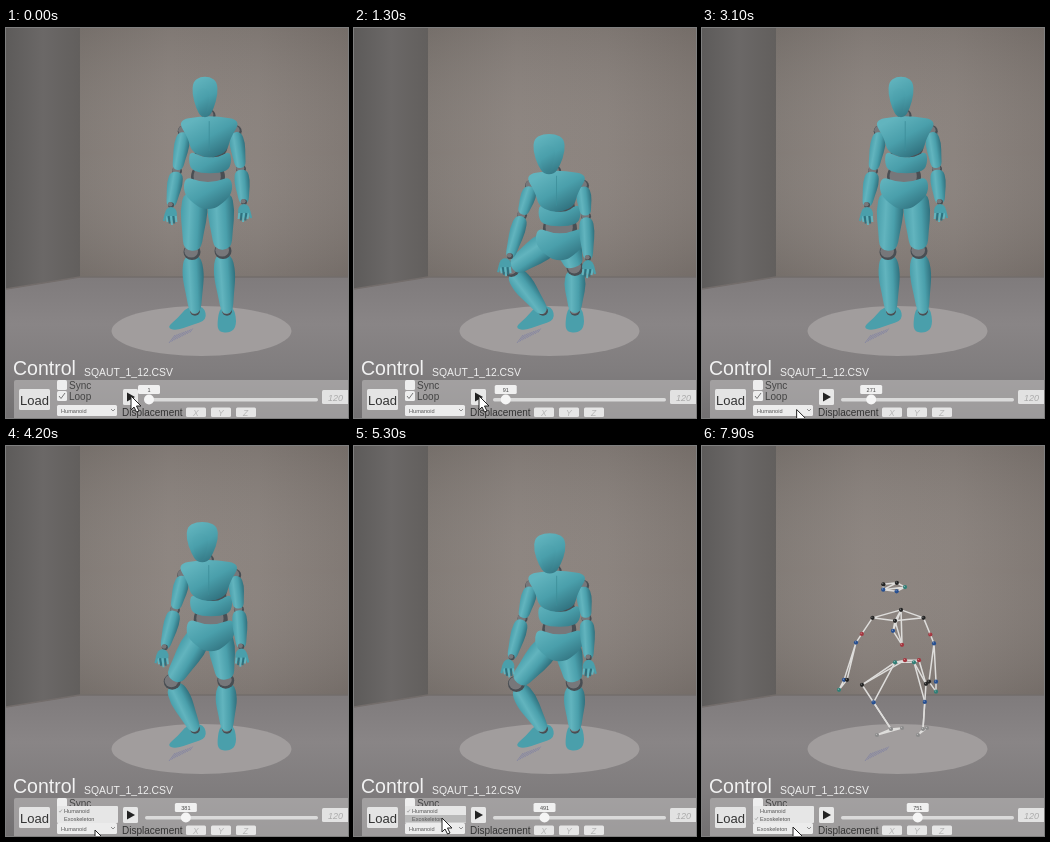
An HTML page with a canvas that plays this animation: 342x390 px, repeating every 8000 ms.

```html
<!DOCTYPE html>
<html lang="en">
<head>
<meta charset="utf-8">
<title>Squat playback</title>
<style>
html, body { margin: 0; width: 100%; height: 100%; overflow: hidden; background: #777; }
canvas { display: block; width: 342px; height: 390px; }
</style>
</head>
<body>
<canvas id="stage"></canvas>
<script>
const W = 342, H = 390, LOOP = 8000, STEP = 100;
const PLAY = 400, PERIOD = 3200, SWITCH = 5700, GROUND = 283;
const canvas = document.getElementById('stage'), c = canvas.getContext('2d');
const dpr = window.devicePixelRatio || 1;
canvas.width = W * dpr;
canvas.height = H * dpr;
c.scale(dpr, dpr);

const TEAL = '#4a9fab', LIGHT = '#62b4be', DARK = '#30707d', GREY = '#77777a', SHADE = '#494e53';

const lerp = (a, b, k) => a + (b - a) * k;
const mix = (a, b, k) => a.map((v, i) => lerp(v, b[i], k));
const add = ([x, y], dx, dy) => [x + dx, y + dy];
const pairs = list => list.flatMap((v, i) => i % 2 ? [] : [[v, list[i + 1]]]);
const ease = (t, from, to) => {
  const k = Math.min(1, Math.max(0, (t - from) / (to - from)));
  return k * k * (3 - 2 * k);
};

// 0 standing, 1 deepest
function depthAt(t) {
  const phase = t % PERIOD;
  return ease(phase, 680, 1350) - ease(phase, 1650, 2800);
}

function cursorAt(t) {
  const menu = mix([125, 368], [89, 384], ease(t, 2200, 3400));
  const item = mix(menu, [88, 372], ease(t, 4600, 5200));
  return mix(item, [91, 381], ease(t, 5800, 6300));
}

// Standing and squatting key points; the other joints follow from these
function skeleton(d) {
  const quick = Math.sqrt(d);
  const key = (x0, y0, x1, y1, ky = d) => [lerp(x0, x1, quick), lerp(y0, y1, ky)];
  const head = key(199, 69, 195, 127), pelvis = key(202, 162, 206, 214);
  const [neck, chest, waist] = [.2, .41, .69].map(k => add(mix(head, pelvis, k), 3, 0));
  const spread = 13 - 6 * d, drop = 5 - 6 * d;
  return {
    head, neck, chest, waist, pelvis,
    arms: [
      [add(chest, -25, -4), key(171, 143, 168, 188), key(165, 177, 156, 229)],
      [add(chest, 26, -4), key(235, 141, 232, 189), key(238, 174, 234, 231)]
    ].map(([sh, el, wr], i) => [sh, el, wr, add(wr, i ? 0 : -5 * d, 11)]),
    legs: [
      [add(pelvis, -spread, drop), key(186, 224, 157, 241, quick), [189, GROUND]],
      [add(pelvis, spread - 1, drop), key(217, 223, 221, 240, quick), [221, GROUND]]
    ]
  };
}

function trace(points, close) {
  c.beginPath();
  points.forEach(p => c.lineTo(...p));
  if (close) c.closePath();
}

function poly(points, fill) {
  trace(points, true);
  c.fillStyle = fill;
  c.fill();
}

function line(points, color, width) {
  trace(points);
  c.strokeStyle = color;
  c.lineWidth = width;
  c.stroke();
}

// Smooth closed shape guided by its corner points
function blob(points, fill) {
  c.beginPath();
  points.forEach((p, i) => {
    const next = points[(i + 1) % points.length];
    if (!i) c.moveTo(...mix(points.at(-1), p, .5));
    c.quadraticCurveTo(...p, ...mix(p, next, .5));
  });
  c.fillStyle = fill;
  c.fill();
}

function oval([x, y], rx, ry, fill) {
  c.beginPath();
  c.ellipse(x, y, rx, ry, 0, 0, 7);
  c.fillStyle = fill;
  c.fill();
}

function box(x, y, w, h, fill, r = 1.5) {
  c.beginPath();
  c.roundRect(x, y, w, h, r);
  c.fillStyle = fill;
  c.fill();
}

function text(s, x, y, size, fill, style = '') {
  c.font = `${style} ${size}px "Liberation Sans", Arial, sans-serif`;
  c.fillStyle = fill;
  c.fillText(s, x, y);
}

function fade(x0, y0, x1, y1, ...colors) {
  const g = c.createLinearGradient(x0, y0, x1, y1);
  colors.forEach((col, i) => g.addColorStop(i / (colors.length - 1), col));
  return g;
}

function room() {
  c.fillStyle = fade(73, 0, W, 0, '#7e7772', '#8a827d', '#88807b', '#7d7570');
  c.fillRect(0, 0, W, H);
  c.fillStyle = fade(0, 0, 0, 250, 'rgba(40,38,36,.1)', 'rgba(255,255,255,.03)', 'rgba(50,46,44,.12)');
  c.fillRect(73, 0, W, 250);
  poly([[0, 0], [74, 0], [74, 250], [0, 262]], fade(0, 0, 74, 0, '#5d5b5a', '#6b6867', '#625f5d'));
  poly([[0, 261], [74, 249], [W, 249], [W, H], [0, H]], fade(0, 249, 0, H, '#7f7b7c', '#898586', '#807d7e', '#727071'));
  line([[0, 261], [74, 249], [W, 249]], '#736d6b', 1.5);
  oval([195.5, 303], 90, 25, '#a19d9d');
  for (let i = 0; i < 9; i++)
    line([[163 + i * 2.6, 315 - i * 1.3], [169 + i * 2.2, 307 - i * .8]], '#8283a2', .8);
}

// Rounded segment from a to b with half-widths at start, bulge and end
function limb(a, b, w0, w1, w2) {
  const dx = b[0] - a[0], dy = b[1] - a[1], len = Math.hypot(dx, dy) || 1;
  const at = (k, w) => [a[0] + dx * k - dy / len * w, a[1] + dy * k + dx / len * w];
  const side = s => [at(-.06, w0 * s), at(.3, w1 * s * 1.08), at(.7, lerp(w1, w2, .5) * s), at(1.05, w2 * s)];
  blob([...side(1), ...side(-1).reverse()], fade(...at(.5, w1), ...at(.5, -w1), TEAL, LIGHT, TEAL, DARK));
}

function joint(p, r) {
  oval(p, r, r * .95, SHADE);
  oval(add(p, -.8, -.8), r * .8, r * .75, GREY);
}

function arm([sh, el, wr, hand], s) {
  joint(sh, 6.5);
  joint(el, 5);
  limb(mix(sh, el, .08), mix(sh, el, .93), 5.5, 7.5, 5);
  limb(mix(el, wr, .08), wr, 6, 7.5, 4.5);
  joint(wr, 3);
  oval(add(hand, 0, -2), 6, 7, TEAL);
  for (let i = -2; i < 3; i++)
    line([add(hand, i * 2.4, 0), add(hand, i * 2.2 + s, 9 - Math.abs(i) * 1.5)], i % 2 ? DARK : LIGHT, 2);
  line([add(hand, -s * 5, -3), add(hand, -s * 7, 5)], TEAL, 2.2);
}

function leg([hip, knee, ankle]) {
  joint(ankle, 5);
  limb(mix(knee, ankle, .1), ankle, 8, 10.5, 5.5);
  joint(knee, 8.5);
  limb(hip, mix(hip, knee, .93), 11, 13, 8.5);
}

// Mirrors a half outline around the centre and shades it from top left
function shell(half, [x, y], sx = 1, sy = 1) {
  const right = pairs(half).map(([px, py]) => [x + px * sx, y + py * sy]);
  const left = right.map(([px, py]) => [2 * x - px, py]).reverse();
  blob([...right, ...left], fade(x - 10, y - 18, x + 12, y + 20, LIGHT, TEAL, DARK));
}

function mannequin({ head, neck, chest, waist, pelvis, arms, legs }, d) {
  const [left, right] = legs.map(l => l[2]);
  const turn = .8 + .2 * Math.min(1, d * 2.2);

  blob([[-7, -5], [9, -5], [12, 9], [-3, 14], [-20, 20], [-28, 16], [-18, 8]].map(p => add(left, ...p)), TEAL);
  blob([[-7, -5], [7, -5], [10, 15], [3, 22], [-8, 21], [-10, 13]].map(p => add(right, ...p)), TEAL);
  legs.toReversed().forEach(leg);

  joint(add(pelvis, 0, -13), 17);
  shell([8, -8, 23, -14, 25, 4, 10, 17, 3, 19], pelvis);
  joint(add(waist, 0, -4), 16);
  shell([8, -4, 21, -11, 21, 7, 10, 12], waist);
  arms.forEach((a, i) => arm(a, i ? -1 : 1));
  joint(neck, 7);
  oval(add(chest, 4, 13), 14, 9, SHADE);
  shell([9, -19, 32, -15, 21, 3, 18, 16, 6, 22], chest);
  line([add(chest, 0, -14), add(chest, 0, 16)], '#3d8d99', .8);
  shell([6, -21, 15, -16, 16, -3, 11, 12, 5, 21], head, turn, .96);
  shell([4, -9, 9, -4, 6, 10, 3, 18], add(head, -2, 0), turn);
}

function rig({ head, pelvis, arms, legs }, d) {
  const sink = ([x, y]) => [x, lerp(GROUND, y, .91)];
  const lines = [], dots = [];
  const link = (...points) => { lines.push(points); };
  const mark = (color, ...points) => points.forEach(p => dots.push([p, color]));
  const [BLACK, BLUE, GREEN, RED, PALE] = ['#222', '#264f91', '#317f77', '#a5363f', '#8b8b8b'];

  const band = [0, 1, 2, 3, 4].map(i => add(sink(head), -4 + 12 * Math.cos(i * 1.26), 4.5 * Math.sin(i * 1.26)));
  link(...band, band[0], band[2], band[4]);
  band.forEach((p, i) => mark([GREEN, BLUE, BLUE, BLACK, BLACK][i], p));

  const shoulders = arms.map(a => add(sink(a[0]), -2 - 5 * d, 2));
  const mid = mix(...shoulders, .5);
  const [top, sternum, back, low] = [[3, -8], [-3, 3], [-5, 13], [4, 27]].map(p => add(mid, ...p));
  link(shoulders[0], sternum, shoulders[1], top, shoulders[0]);
  link(top, sternum, back, low, top, back);
  link(sternum, low);
  mark(BLACK, ...shoulders, top, sternum);
  mark(BLUE, back);
  mark(RED, low);

  arms.forEach(([, el, wr, hand], i) => {
    const reach = i ? 0 : 14 * d;
    const [e, w, h] = [el, wr, hand].map(p => add(sink(p), -reach, 0));
    const upper = mix(shoulders[i], e, .65), thumb = add(w, i ? -7 : 3, 0);
    link(shoulders[i], upper, e, w, h, thumb, e);
    mark(RED, upper);
    mark(BLUE, e, w);
    mark(BLACK, thumb);
    mark(GREEN, h);
  });

  const hips = legs.map((l, i) => add(sink(l[0]), i ? 0 : -6, -3));
  const rear = [-3, 11].map(x => add(sink(pelvis), x, -6));
  link(hips[0], ...rear, hips[1], hips[0]);
  mark(GREEN, ...hips);
  mark(RED, ...rear);

  legs.forEach(([, k, a], i) => {
    const knee = add(sink(k), 3, -6), shin = mix(knee, a, .4);
    const toe = add(a, i ? -5 : -14, 6), heel = add(a, i ? 4 : 11, -1);
    link(hips[i], knee, a, toe, heel, a);
    link(hips[i], shin, a);
    link(rear[i], knee);
    mark(BLACK, knee);
    mark(BLUE, shin);
    mark(PALE, a, toe, heel);
  });

  c.lineJoin = 'round';
  lines.forEach(points => line(points, '#dedddb', 1.5));
  dots.forEach(([p, color]) => {
    oval(p, 2.1, 2.1, color);
    oval(add(p, -.6, -.7), .6, .6, 'rgba(255,255,255,.45)');
  });
}

function tick(x, y, s = 1) {
  line([[x, y], [x + 2 * s, y + 2.5 * s], [x + 6 * s, y - 3 * s]], '#777', s);
}

function controls(t) {
  const exo = t >= SWITCH;
  const open = t >= 3700 && !exo || t >= 7400;
  const played = Math.max(0, t - PLAY);
  const knob = 143 + played * .0097;
  const [cx, cy] = cursorAt(t);

  text('Control', 7, 347, 19.5, '#f2f2f2');
  text('SQAUT_1_12.CSV', 78, 348, 10.4, '#eee');
  box(8, 352, W, 40, 'rgba(200,198,198,.5)', 2);
  box(13, 361, 31, 21, '#e4e4e4');
  text('Load', 14, 376.5, 13, '#333');
  box(51, 352, 10, 10, '#eee');
  box(51, 363, 10, 10, '#eee');
  tick(53, 368);
  text('Sync', 63, 361, 10, '#444');
  text('Loop', 63, 372, 10, '#444');

  box(51, 377, 60, 11, '#ececec');
  text(exo ? 'Exoskeleton' : 'Humanoid', 55, 384.5, 5.6, '#555');
  line([[105, 381], [107, 383], [109, 381]], '#777', .8);
  if (open) {
    box(51, 360, 61, 17, '#e6e6e6', 1);
    if (cy < 377) box(51, 369, 61, 7.5, '#b9b9b9', 0);
    text('Humanoid', 58, 367, 5.6, '#555');
    text('Exoskeleton', 58, 374.5, 5.6, '#555');
    tick(53, exo ? 372.5 : 365, .5);
  }

  box(117, 361, 15, 16, '#e8e8e8');
  poly([[121, 364.5], [129, 369], [121, 373.5]], '#222');
  box(139, 370, 173, 3.5, '#dadada', 1.7);
  oval([knob, 371.5], 5, 5, '#f5f5f5');
  box(knob - 11, 357, 22, 9, '#f0f0f0');
  c.textAlign = 'center';
  text(1 + Math.floor(played / 10), knob, 363.6, 5.5, '#444');
  c.textAlign = 'left';
  box(316, 362, 30, 14, '#e2e2e2');
  text('120', 322, 373, 9, '#aaa', 'italic');

  text('Displacement', 116, 388, 10, '#333');
  ['X', 'Y', 'Z'].forEach((s, i) => {
    box(180 + i * 25, 379.5, 20, 9.5, '#e6e6e6');
    text(s, 187 + i * 25, 387.5, 8.5, '#b4b4b4', 'italic');
  });

  const arrow = [[0, 0], [0, 14], [3, 11], [5.5, 16], [8, 15], [5.5, 10], [10, 10]];
  poly(arrow.map(p => add(p, cx, cy)), '#fff');
  c.strokeStyle = '#222';
  c.lineWidth = 1;
  c.stroke();
}

function frame() {
  const t = Math.floor(performance.now() % LOOP / STEP) * STEP;
  const depth = depthAt(t);
  room();
  (t < SWITCH ? mannequin : rig)(skeleton(depth), depth);
  controls(t);
  requestAnimationFrame(frame);
}
frame();
</script>
</body>
</html>
```
